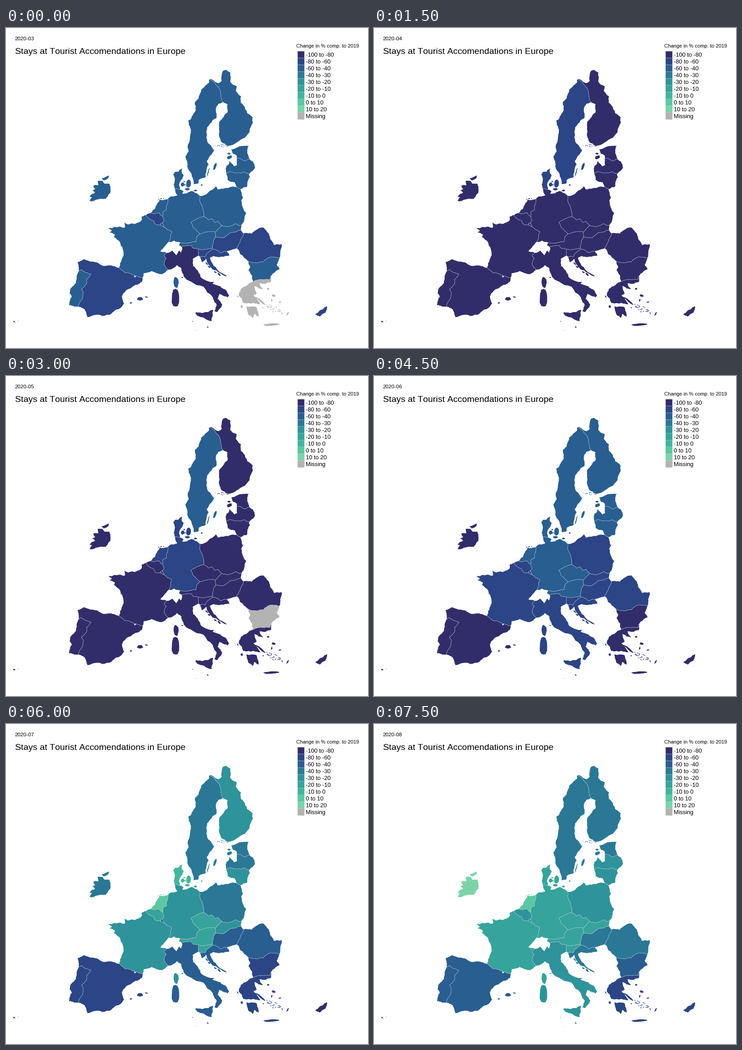
A matplotlib script that plays this animation: 797x703 px, repeating every 8 s.

```python
import numpy as np
import matplotlib.pyplot as plt
from matplotlib.animation import FuncAnimation
from matplotlib.collections import LineCollection, PolyCollection
from matplotlib.patches import Rectangle

plt.rcParams["text.kerning_factor"] = 6  # plain advance widths

W, H, DPI = 797, 703, 100
PALETTE = ["#312d6b", "#2b4586", "#295e91", "#2a7896", "#2f939b",
           "#36a49c", "#43b69d", "#5ac8a0", "#7bd4a8", "#b3b3b3"]
STEPS = [-100, -80, -60, *range(-40, 21, 10)]
LABELS = [f"{a} to {b}" for a, b in zip(STEPS, STEPS[1:])] + ["Missing"]
MONTHS = [f"2020-{m:02d}" for m in range(3, 9)]
MISSING = len(PALETTE) - 1
LINE = "#c9ccd6"

rng = np.random.default_rng(11)
borders = []
countries = []


def rough(xy, amp, depth=3):
    """Turn a few key points into a jagged line by midpoint displacement."""
    p = np.array(xy, float).reshape(-1, 2)
    for _ in range(depth):
        d = np.diff(p, axis=0)
        shift = rng.uniform(-amp, amp, (len(d), 1))
        mid = (p[:-1] + p[1:]) / 2 + shift * np.column_stack([-d[:, 1], d[:, 0]])
        out = np.empty((len(p) + len(mid), 2))
        out[0::2], out[1::2] = p, mid
        p = out
    return p


def coast(*xy):
    return rough(xy, 0.12)


def border(*xy):
    line = rough(xy, 0.1)
    borders.append(line)
    return line


def isle(*xy):
    return rough(xy + xy[:2], 0.12)


def blob(x, y, w, h, tilt=0):
    """Ragged oval island of size w by h, turned by tilt degrees."""
    a = np.linspace(0, 2 * np.pi, 13)[:-1]
    r = rng.uniform(0.85, 1.15, len(a)) / 2
    z = (r * (w * np.cos(a) + 1j * h * np.sin(a))) * np.exp(1j * np.radians(tilt))
    return np.column_stack([x + z.real, y + z.imag])


def skerries(n, start, end, spread, size):
    """Tiny islands scattered along a line."""
    start, end = np.array(start), np.array(end)
    spots = start + (end - start) * rng.uniform(0, 1, (n, 1)) + rng.uniform(-spread, spread, (n, 2))
    return [blob(x, y, size * rng.uniform(0.6, 1.4), size * 0.6, 35) for x, y in spots]


def ring(*arcs):
    """Join arcs end to end, flipping each one where needed."""
    def gap(p, a):
        return min(np.hypot(*(p - a[0])), np.hypot(*(p - a[-1])))

    path = arcs[0]
    if gap(path[0], arcs[1]) < gap(path[-1], arcs[1]):
        path = path[::-1]
    for a in arcs[1:]:
        if np.hypot(*(path[-1] - a[0])) > np.hypot(*(path[-1] - a[-1])):
            a = a[::-1]
        path = np.vstack([path, a])
    return path


def country(levels, *rings):
    """levels holds one colour class per month."""
    countries.append((levels, rings))


# Shared borders
se_fi = border(447, 113, 460, 121, 470, 134, 478, 163)
ee_lv = border(508, 287, 514, 286, 525, 292, 536, 288)
lv_lt = border(485, 320, 491, 316, 507, 318, 524, 316, 535, 321)
lt_pl = border(509, 350, 516, 354)
pl_de = border(427, 369, 428, 384, 433, 395, 436, 414)
pl_cz = border(436, 414, 446, 422, 452, 419, 460, 427, 467, 425, 475, 434)
pl_sk = border(475, 434, 484, 436, 505, 430, 518, 434)
cz_sk = border(475, 434, 461, 448)
cz_de = border(436, 414, 407, 427, 414, 440, 427, 452)
cz_at = border(427, 452, 447, 447, 461, 448)
at_sk = border(461, 448, 461, 460)
sk_hu = border(461, 460, 480, 461, 495, 449, 517, 444)
at_hu = border(461, 460, 457, 466, 455, 483)
at_si = border(455, 483, 441, 486, 424, 486)
at_it = border(424, 486, 412, 484, 408, 478, 387, 481)
at_de = border(427, 452, 421, 457, 418, 470, 396, 473, 383, 471)
hu_si = border(455, 483, 455, 486)
hu_hr = border(455, 486, 460, 486, 472, 494, 486, 491)
hu_ro = border(523, 451, 517, 464, 508, 484)
ro_bg = border(602, 505, 588, 503, 577, 505, 566, 514, 552, 516, 532, 511)
bg_gr = border(544, 557, 566, 553, 581, 552, 583, 545)
si_it = border(424, 486, 424, 500)
si_hr = border(455, 486, 447, 492, 438, 503, 427, 502)
de_dk = border(371, 352, 383, 355)
de_nl = border(357, 375, 355, 388, 353, 400, 346, 403, 345, 414)
de_be = border(345, 414, 348, 422, 344, 428)
de_lu = border(344, 428, 348, 437)
be_lu = border(344, 428, 340, 430, 341, 433)
fr_lu = border(341, 433, 348, 437)
fr_be = border(308, 411, 324, 423, 331, 432, 341, 433)
nl_be = border(319, 406, 325, 408, 337, 406, 345, 414)
fr_de = border(348, 437, 365, 447, 358, 470)
fr_it = border(354, 494, 348, 500, 353, 506, 348, 520, 357, 531)
fr_es = border(249, 527, 262, 538, 280, 543, 301, 549)
es_pt = border(160, 534, 166, 531, 174, 537, 187, 541, 177, 552, 178, 561, 166, 574, 170, 581, 169, 593, 160, 612)

# North
country((2, 0, 0, 2, 4, 3),
        ring(se_fi,
             coast(447, 113, 452, 112, 469, 121, 475, 115, 477, 95, 484, 92, 494, 98, 494, 119, 508, 128,
                   506, 137, 517, 150, 517, 164, 530, 182, 532, 188, 543, 196, 540, 215, 526, 241),
             coast(526, 241, 488, 259, 474, 250, 470, 227, 469, 208, 488, 185, 488, 168, 478, 163)),
        *skerries(22, (463, 259), (492, 257), 3, 1.8))
country((2, 1, 2, 2, 3, 3),
        ring(se_fi,
             coast(447, 113, 446, 121, 431, 134, 424, 155, 416, 162, 418, 173, 408, 198, 401, 204, 407, 230,
                   401, 255, 402, 271, 395, 284, 399, 304, 411, 329, 413, 343, 424, 341),
             coast(424, 341, 424, 334, 440, 327, 446, 300, 442, 292, 458, 269, 445, 253, 441, 228,
                   463, 198, 462, 180, 467, 167, 478, 163)),
        blob(460, 304, 5, 17, 20), blob(445, 317, 2, 20, 15), *skerries(9, (456, 262), (457, 280), 3, 1.6))
country((2, 0, 0, 2, 3, 3),
        ring(ee_lv, coast(536, 288, 531, 275, 534, 259, 512, 261, 496, 267, 500, 277, 508, 280, 508, 287)),
        blob(492, 284, 12, 7, -25), blob(491, 276, 7, 4))
country((2, 0, 0, 2, 3, 4),
        ring(ee_lv, coast(536, 288, 543, 293, 548, 307, 535, 321), lv_lt,
             coast(485, 320, 485, 304, 493, 292, 503, 304, 509, 301, 508, 287)))
country((2, 0, 0, 2, 4, 4),
        ring(lv_lt, coast(535, 321, 537, 328, 531, 348, 516, 354), lt_pl,
             coast(509, 350, 504, 339, 488, 334, 485, 320)))
country((2, 1, 1, 2, 6, 5),
        ring(de_dk, coast(371, 352, 368, 321, 372, 316, 379, 316, 389, 306, 387, 319, 391, 323, 383, 338, 383, 355)),
        blob(389, 344, 8, 9), blob(402, 342, 11, 17), blob(399, 354, 11, 5), blob(431, 345, 4, 3, 30),
        *skerries(5, (393, 333), (396, 352), 3, 2.5))
country((2, 0, 0, 0, 3, 8),
        isle(202, 336, 213, 336, 217, 342, 228, 342, 230, 360, 220, 375, 184, 380, 190, 372, 183, 370,
             196, 362, 190, 357, 196, 354, 192, 347, 204, 345),
        isle(211, 330, 227, 324, 225, 330, 215, 335))

# West
country((2, 0, 1, 2, 4, 5),
        ring(pl_de, cz_de, at_de, coast(383, 471, 370, 467, 358, 470), fr_de, de_lu, de_be, de_nl,
             coast(357, 375, 361, 371, 377, 368, 371, 352), de_dk,
             coast(383, 355, 391, 359, 388, 364, 408, 358, 427, 369)),
        blob(417, 357, 7, 4))
country((2, 0, 1, 2, 7, 7),
        ring(nl_be, de_nl, coast(357, 375, 338, 377, 328, 397, 319, 406)),
        *skerries(5, (333, 377), (352, 373), 0.6, 2.4))
country((1, 0, 0, 1, 5, 4), ring(nl_be, de_be, be_lu, fr_be, coast(308, 411, 319, 406)))
country((1, 0, 0, 1, 2, 4), ring(de_lu, fr_lu, be_lu))
country((2, 0, 0, 1, 4, 5),
        ring(fr_be, fr_lu, fr_de, coast(358, 470, 340, 491, 354, 494), fr_it,
             coast(357, 531, 343, 541, 320, 534, 303, 539, 301, 549), fr_es,
             coast(249, 527, 256, 506, 259, 498, 257, 486, 250, 469, 238, 459, 240, 453, 227, 449, 233, 445,
                   226, 440, 239, 437, 262, 438, 261, 427, 269, 432, 285, 430, 298, 423, 299, 414, 308, 411)),
        blob(374, 559, 11, 24))
country((1, 0, 0, 0, 1, 2),
        ring(fr_es,
             coast(301, 549, 300, 557, 271, 573, 255, 590, 260, 605, 249, 617, 232, 628, 192, 631, 179, 635,
                   173, 618, 160, 612), es_pt,
             coast(160, 534, 160, 525, 158, 514, 172, 508, 210, 521, 249, 527)),
        blob(295, 595, 14, 8), blob(309, 591, 6, 2.5, 20), blob(275, 604, 5, 3, -30))
country((2, 0, 0, 0, 1, 2),
        ring(es_pt, coast(160, 612, 139, 609, 145, 590, 140, 583, 154, 560, 160, 534)),
        blob(18, 645, 5, 3, 25), blob(27, 643.5, 1.2, 1))

# Centre
country((2, 0, 0, 1, 3, 4),
        ring(pl_de, pl_cz, pl_sk, coast(518, 434, 529, 407, 521, 394, 518, 380, 522, 372, 516, 354), lt_pl,
             coast(509, 350, 482, 352, 467, 355, 462, 348, 427, 369)))
country((2, 0, 0, 2, 5, 5), ring(cz_de, pl_cz, cz_sk, cz_at))
country((2, 0, 0, 1, 4, 5), ring(pl_sk, coast(518, 434, 517, 444), sk_hu, at_sk, cz_sk))
country((2, 0, 0, 2, 5, 5), ring(cz_at, at_sk, at_hu, at_si, at_it, coast(387, 481, 381, 478, 383, 471), at_de))
country((1, 0, 0, 1, 2, 3),
        ring(sk_hu, coast(517, 444, 523, 451), hu_ro, coast(508, 484, 486, 491), hu_hr, hu_si, at_hu))
country((1, 0, 0, 1, 5, 5), ring(at_si, hu_si, si_hr, coast(427, 502, 424, 500), si_it))
country((1, 0, 0, 1, 2, 3),
        ring(hu_hr,
             coast(486, 491, 492, 500, 456, 501, 449, 505, 463, 527, 486, 546),
             coast(486, 546, 454, 530, 441, 507, 432, 515, 427, 502), si_hr),
        *skerries(6, (437, 510), (448, 526), 1, 4), *skerries(5, (460, 537), (472, 543), 1, 5))
country((0, 0, 0, 1, 2, 4),
        ring(fr_it, coast(354, 494, 366, 489, 375, 499, 381, 489, 385, 493, 387, 481), at_it, si_it,
             coast(424, 500, 411, 507, 412, 523, 428, 546, 459, 558, 455, 562, 486, 578, 491, 587, 488, 592,
                   470, 584, 466, 595, 476, 608, 465, 624, 459, 622),
             coast(459, 622, 464, 608, 455, 591, 407, 557, 391, 545, 386, 528, 376, 521, 357, 531)),
        blob(373, 593, 17, 37), isle(417, 625, 433, 626, 456, 619, 453, 644, 421, 632),
        blob(388, 548, 4, 2), blob(411, 644.5, 2, 1.5), blob(419, 664.5, 1.2, 1))

# South-east
country((1, 0, 0, 1, 2, 3),
        ring(hu_ro,
             coast(523, 451, 541, 452, 566, 438, 579, 452, 590, 477, 607, 475, 602, 505), ro_bg,
             coast(532, 511, 516, 497, 508, 484)))
country((2, 0, MISSING, 0, 1, 2),
        ring(ro_bg, coast(602, 505, 596, 520, 602, 530, 583, 545), bg_gr,
             coast(544, 557, 534, 532, 538, 524, 532, 511)))
country((MISSING, 0, 0, 0, 1, 1),
        ring(bg_gr,
             coast(583, 545, 583, 558, 558, 561, 566, 574, 547, 567, 552, 583, 545, 588, 560, 607, 545, 604),
             coast(545, 604, 522, 604, 512, 587, 517, 573, 544, 557)),
        isle(529, 612, 552, 614, 556, 634, 547, 628, 544, 637, 535, 631),
        blob(561, 600, 25, 4, 42), blob(584, 651.5, 36, 5, -3), blob(620, 628, 3, 9, 30),
        blob(589, 588, 8, 5, 20), blob(585, 598, 3, 6, 15), blob(603, 602, 6, 2.5, -10),
        blob(577, 573, 5, 4), blob(519, 612, 5, 6), blob(510, 590, 2, 5, -35),
        *skerries(22, (568, 608), (604, 624), 8, 3))
country((1, 0, 0, 0, 0, 1), isle(681, 629, 697, 618, 707, 611, 704, 624, 691, 634))
country((1, 0, 0, 0, 1, 2), blob(444, 657, 4, 2.5, 35))

fig = plt.figure(figsize=(W / DPI, H / DPI), dpi=DPI, facecolor="white")
ax = fig.add_axes([0, 0, 1, 1])
ax.set_xlim(0, W)
ax.set_ylim(H, 0)
ax.axis("off")


def label(x, y, text, px):
    return ax.text(x, y, text, family="Liberation Sans", size=px * 72 / DPI, va="baseline")


fills = []
for levels, rings in countries:
    fill = PolyCollection(rings, facecolor=PALETTE[levels[0]], edgecolor="none", linewidth=0, zorder=1)
    fills.append(ax.add_collection(fill))
ax.add_collection(LineCollection(borders, colors=LINE, linewidths=0.45, zorder=2))
andorra = blob(284, 546, 4, 3)
ax.add_collection(PolyCollection([andorra], facecolor="white", zorder=3))

date = label(19.4, 26.7, MONTHS[0], 11.5)
label(20, 57, "Stays at Tourist Accomendations in Europe", 19.48)
label(639.4, 43.3, "Change in % comp. to 2019", 11.1)
for i, (color, text) in enumerate(zip(PALETTE, LABELS)):
    ax.add_patch(Rectangle((642, 51 + 15 * i), 15, 15, facecolor=color, edgecolor=LINE, linewidth=0.35))
    label(660, 63.2 + 15 * i, text, 12.7)


def update(frame):
    month = min(frame // 3, len(MONTHS) - 1)
    date.set_text(MONTHS[month])
    for fill, (levels, _) in zip(fills, countries):
        fill.set_facecolor(PALETTE[levels[month]])
    return [date, *fills]


anim = FuncAnimation(fig, update, frames=16, interval=500, repeat=True, repeat_delay=0, blit=False)
plt.show()
```
